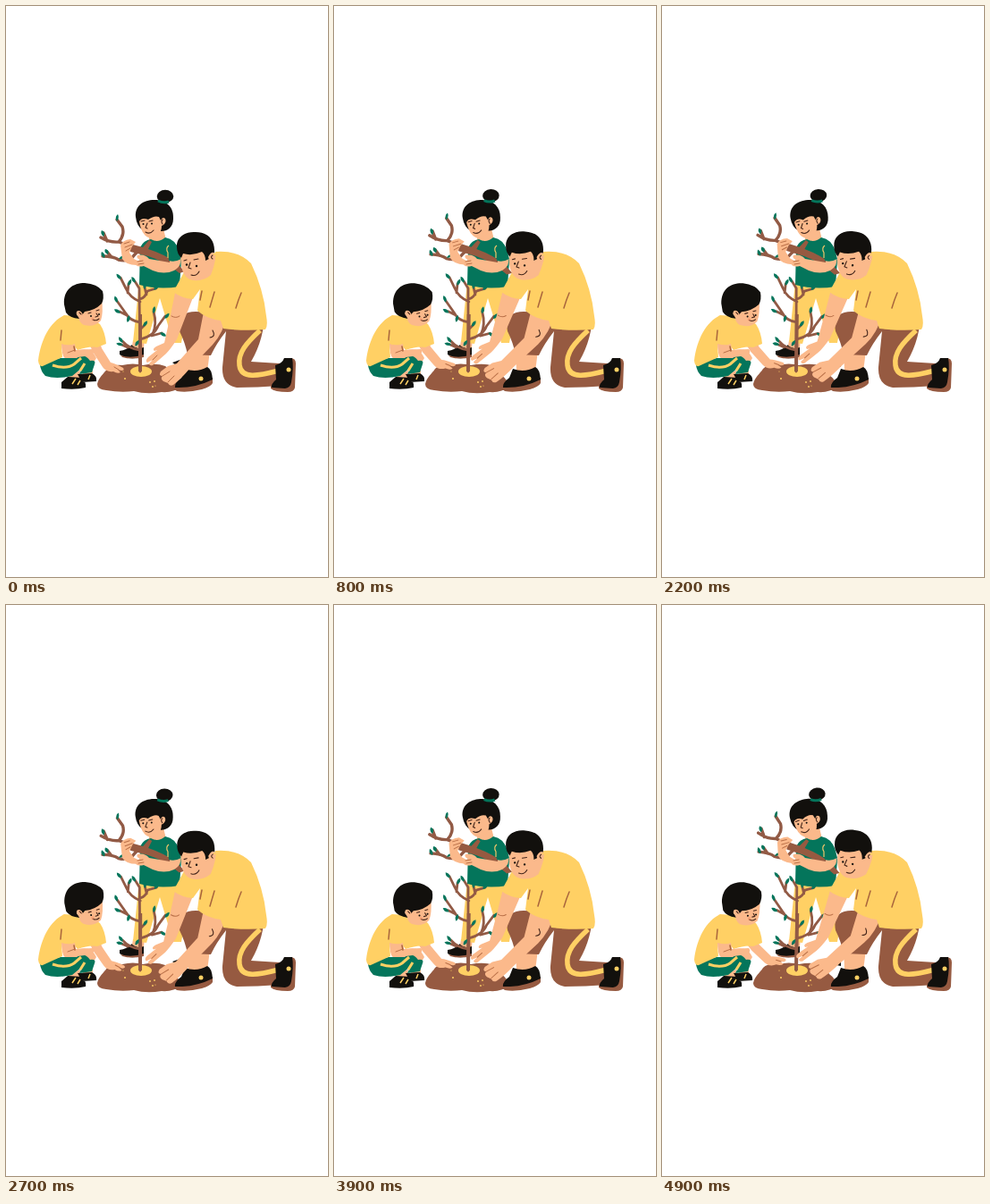
These frames come from a looping animation (360x639 px, 5 s). An HTML page:

```html
<!DOCTYPE html>
<html lang="en">
<head>
<meta charset="utf-8">
<title>Planting a tree</title>
<style>
html, body { margin: 0; width: 100%; height: 100%; overflow: hidden; background: #fff; }
svg { display: block; width: 100%; height: 100%; }
.k { fill: #12100d; } .y { fill: #ffd064; } .g { fill: #04755b; } .b { fill: #965a41; } .s { fill: #fbb98b; }
.l { fill: none; stroke: #43251a; stroke-width: 1.1; stroke-linecap: round; stroke-linejoin: round; }
.fold { stroke: #a9653c; stroke-width: 1.5; }
.crease { stroke: #b96f47; stroke-width: 1; }
.wood { fill: none; stroke: #925a45; stroke-width: 2.8; stroke-linecap: round; stroke-linejoin: round; }
.stripe { fill: none; stroke: #ffd064; stroke-width: 3; }
</style>
</head>
<body>
<svg viewBox="0 0 360 639">
  <!-- girl -->
  <path class="k" d="M127 386Q135 385 141 379L154 380L154 391Q152 394 145 394Q134 395 127 390Z"/>
  <path class="b" d="M128 391Q140 395 154 390V393Q140 396 130 393Z"/>
  <path class="s" d="M142 374H155L154 382Q147 385 141 380Z"/>
  <path class="y" d="M149 309L195 312L199 360L196 377H187L172 327L157 378L142 376Z"/>
  <path class="k" d="M186 399L200 394V404L190 402Z"/>
  <path class="s" d="M160 253L176 249L179 262Q169 268 160 262Z"/>
  <path class="g" d="M150 270Q154 262 162 261Q170 266 178 259Q190 261 193 274L196 285L194 314Q171 318 149 312Z"/>
  <g id="girlHead">
    <ellipse class="k" cx="178" cy="213" rx="9.3" ry="7.2"/>
    <path class="k" d="M145 236C144 224 153 217 166 217C180 217 188 226 187 238C187 248 180 252 174 252L153 251Q146 246 145 236Z"/>
    <path d="M170 218Q176 221 182 219" fill="none" stroke="#04755b" stroke-width="3"/>
    <path class="s" d="M149 241Q152 236 159 239Q166 234 171 236L173 240Q175 235 178 238Q180 243 174 246Q174 256 164 260Q152 260 149 241Z"/>
    <path class="l" d="M151 241L155 240M160 241L164 240M158 243L156 248L158 249M156 253Q161 256 165 251M175 239Q173 241 175 244"/>
    <circle class="k" cx="153.500" cy="244" r="1"/><circle class="k" cx="163" cy="243.500" r="1"/>
  </g>
  <g id="branch">
    <path class="wood" style="stroke-width:3.400" d="M106 259Q116 265 126 264L140 269M126 264Q133 256 130 247L124 239M113 263L109 254M108 280Q120 280 126 284Q138 287 144 278L150 272M118 281L113 275"/>
    <path class="b" d="M138 266L153 270L160 262L163 264L159 272Q178 278 191 288L200 297L194 299Q178 286 159 280L139 275Z"/>
    <path class="g" d="M124 241Q121 236 125 233Q127 237 124 241ZM109 258Q105 255 107 251Q112 253 109 258ZM110 282Q105 280 107 275Q112 278 110 282ZM114 278Q109 276 111 272Q116 273 114 278ZM126 283Q129 278 132 280Q130 284 126 283Z"/>
    <path class="s" d="M128 268Q130 262 139 261L145 264L141 269L138 276L143 283L149 286L146 290Q134 290 130 283Z"/>
    <path class="l crease" d="M132 266L138 264M133 270L141 267M134 274L139 271"/>
  </g>
  <path class="s" d="M183 284L195 282Q197 291 188 296Q177 301 164 296L154 291Q145 293 144 287L150 284Q145 282 147 279Q155 277 160 283L183 287Z"/>
  <path class="g" d="M181 264Q191 263 194 275L196 283Q189 287 182 285Z"/>
  <path d="M182 268Q178 271 181 276V282" fill="none" stroke="#f0c66a" stroke-width="1.200"/>
  <path class="l crease" d="M147 286L153 285M148 289L154 288"/>

  <!-- soil and sapling -->
  <path class="b" d="M102 423C104 415 109 412 113 406Q118 401 130 402Q142 399 153 402Q168 399 178 403Q184 407 187 413Q194 418 196 426Q187 433 174 432Q157 435 143 431Q128 433 112 430Q102 429 102 423Z"/>
  <ellipse class="y" cx="151" cy="409" rx="12" ry="6"/>
  <g class="y"><circle cx="133" cy="417" r="1"/><circle cx="161" cy="421" r=".9"/><circle cx="166" cy="420" r=".9"/><circle cx="164" cy="426" r=".9"/><circle cx="131" cy="409" r=".6"/><circle cx="167" cy="425" r=".6"/></g>
  <g id="tree">
    <path class="wood" d="M150 409L149 316L144 308M150 385Q138 384 130 375M136 382L129 379M150 373Q166 369 170 358L178 347M163 369L174 366M164 367Q169 356 165 342M150 354Q138 352 134 344L124 330M135 346L127 342M150 331Q138 326 134 316L128 304M136 321L137 311M150 328Q156 326 158 319L168 316M157 323L155 315M150 362L155 357"/>
    <path d="M150 409V345" stroke="#925a45" stroke-width="4"/>
    <g class="g" id="leaves"></g>
  </g>

  <!-- man -->
  <path class="s" d="M203 378H229L225 409H204Z"/>
  <path class="b" d="M241 343H289Q289 372 274 398L306 400V425Q281 427 258 427Q241 424 242 404L246 364Q235 378 229 391L203 390Q200 376 194 364Q190 342 212 342Z"/>
  <path class="stripe" style="stroke-width:5.500" d="M284 363C269 377 259 388 261 402C263 418 282 414 305 408"/>
  <path class="b" d="M318 394Q324 394 324 400L323 427Q322 432 315 432Q300 432 296 428V424L314 424Z"/>
  <path class="k" d="M301 402Q309 400 311 394H320Q322 404 319 421Q318 427 312 428L297 427Q296 423 302 418Z"/>
  <circle class="y" cx="316" cy="407" r="2.500"/>
  <path class="b" d="M188 424L231 416V422Q229 426 219 429Q203 433 191 431Q187 429 188 424Z"/>
  <path class="k" d="M200 406Q213 411 225 404Q230 406 231 418Q211 428 189 427Q188 422 196 416Z"/>
  <circle class="y" cx="218" cy="417" r="2.500"/>
  <g id="farArm">
    <path class="s" d="M190 316L211 321L191 373Q184 384 179 389L171 396L164 402Q160 403 160 400L164 396L158 399Q155 397 159 393L169 385L166 386Q163 384 168 381L177 377Q184 347 190 316Z"/>
    <path class="l crease" d="M164 396L169 391M185 347Q190 350 194 347"/>
  </g>
  <g id="nearArm">
    <path class="s" d="M222 337L247 346Q243 366 231 379L206 405Q196 417 187 424Q183 426 181 422L176 420Q172 417 175 414Q170 414 173 409L181 403L191 400L215 373Z"/>
    <path class="l crease" d="M175 414L183 409M181 421L188 414"/>
    <path class="l" d="M228 371Q235 370 231 363"/>
  </g>
  <path class="y" d="M199 298L187 320Q196 327 209 328L217 317L214 341Q224 350 240 352L243 361Q266 364 290 362Q293 358 291 347Q288 317 274 288Q260 273 234 275L226 297Z"/>
  <path class="l fold" d="M233 320L228 337M263 321Q260 328 257 338M219 319L217 329"/>
  <g id="manHead">
    <path class="s" d="M194 268L232 272L234 284Q232 294 229 301Q221 308 210 307Q199 306 196 291Z"/>
    <path class="k" d="M191 270C190 259 200 252 212 253C226 253 233 262 233 273L233 279Q229 276 227 283L223 285Q223 278 219 275Q208 280 198 277L196 282Q191 277 191 270Z"/>
    <path class="s" d="M226 281Q230 273 234 277Q236 284 228 287Z"/>
    <path class="l" d="M199 285L202 284M210 284L215 283M206 287L204 293L207 294M207 301Q213 303 216 297M231 279Q228 281 231 283"/>
    <circle class="k" cx="202" cy="289.500" r="1.200"/><circle class="k" cx="213" cy="291" r="1.200"/>
    <circle class="y" cx="233" cy="278" r="1.200"/>
  </g>

  <!-- boy -->
  <g id="boyArm">
    <path class="s" d="M91 373L103 370L107 383L117 399Q122 400 131 405Q133 408 129 408L125 407L128 410Q125 412 120 409Q112 410 108 404L97 387Z"/>
    <path class="l crease" d="M121 404L126 407"/>
  </g>
  <path class="s" d="M70 411L83 408L82 419H70ZM86 408H97V414H86Z"/>
  <path class="k" d="M62 421L69 415L85 416Q90 421 89 427Q77 430 62 428ZM80 412L96 411Q102 414 101 420L85 421Z"/>
  <path d="M74 423L78 417M80 424L83 419M92 418L94 413" fill="none" stroke="#ffd064" stroke-width="1.500"/>
  <path class="s" d="M63 377H77L78 386Q95 380 101 394Q98 400 92 402L73 397Q64 396 63 388Z"/>
  <path class="g" d="M38 402Q48 397 61 394L79 394Q87 388 94 397Q101 396 99 401L96 410L82 412L86 404L74 414Q56 418 44 414Q39 409 38 402Z"/>
  <path class="stripe" d="M52 402Q67 407 76 401L84 394M83 408L88 400"/>
  <path class="y" d="M65 346C49 354 39 373 36 397Q37 404 41 403Q52 398 63 393L62 379L76 380L80 385Q94 380 102 382L112 378Q111 365 105 356L93 348Z"/>
  <path class="s" d="M62 378Q70 381 77 378L78 385L97 384Q100 387 96 391L72 394Q62 394 62 378Z"/>
  <path class="l fold" d="M62 363L61 374M76 381L77 386"/>
  <path class="l crease" d="M69 388L77 385"/>
  <g id="boyHead">
    <path class="s" d="M78 336L107 327Q109 344 106 352Q99 360 87 357Q80 354 78 336Z"/>
    <path class="k" d="M65 334C64 317 75 310 88 310Q102 311 108 319Q110 327 107 333Q99 341 88 342L85 346L84 342Q79 340 79 345L82 350Q71 349 67 343Z"/>
    <path class="s" d="M84 348Q77 347 79 342Q82 339 86 345Z"/>
    <path class="l" d="M92 344L95 343M101 341L104 340M101 344L103 347L100 348M97 351Q101 353 104 350M82 343L84 345"/>
    <circle class="k" cx="95" cy="347" r="1"/><circle class="k" cx="104" cy="345" r="1"/>
    <circle cx="97" cy="350" r="1.800" fill="#f28f66" opacity=".5"/>
  </g>
</svg>
<script>
const $ = id => document.getElementById(id);

// x, y, angle of each leaf on the sapling
const leaves = [
  [128, 305, -40], [137, 312, 25], [124, 331, -20], [127, 343, -60], [130, 376, -35], [130, 379, -80],
  [144, 309, -30], [155, 316, 0], [166, 317, 45], [165, 343, 10], [178, 349, 40], [173, 366, 120],
  [154, 358, 35], [136, 353, 15], [145, 380, 30]
];
$('leaves').innerHTML = leaves.map(([x, y, a]) =>
  `<path d="M0 1Q-3.500-3 0-7Q3.500-3 0 1Z" transform="translate(${x} ${y}) rotate(${a})"/>`).join('');

// full swing in degrees and pivot
const swings = {
  girlHead: [-6.5, 164, 256],
  branch: [4.5, 160, 280],
  tree: [1.2, 151, 408],
  farArm: [4.5, 205, 305],
  nearArm: [6.2, 240, 330],
  manHead: [5.5, 225, 292],
  boyArm: [-15, 97, 374],
  boyHead: [4.5, 85, 360]
};
const LOOP = 5000, STEP = 100, PERIOD = 3100;

function draw(now) {
  const t = Math.floor(now % LOOP / STEP) * STEP;
  const p = (1 - Math.cos(2 * Math.PI * t / PERIOD)) / 2;
  for (const [id, [angle, x, y]] of Object.entries(swings))
    $(id).setAttribute('transform', `rotate(${angle * p} ${x} ${y})`);
}

const start = performance.now();
function tick() {
  draw(performance.now() - start);
  requestAnimationFrame(tick);
}
tick();
</script>
</body>
</html>
```
